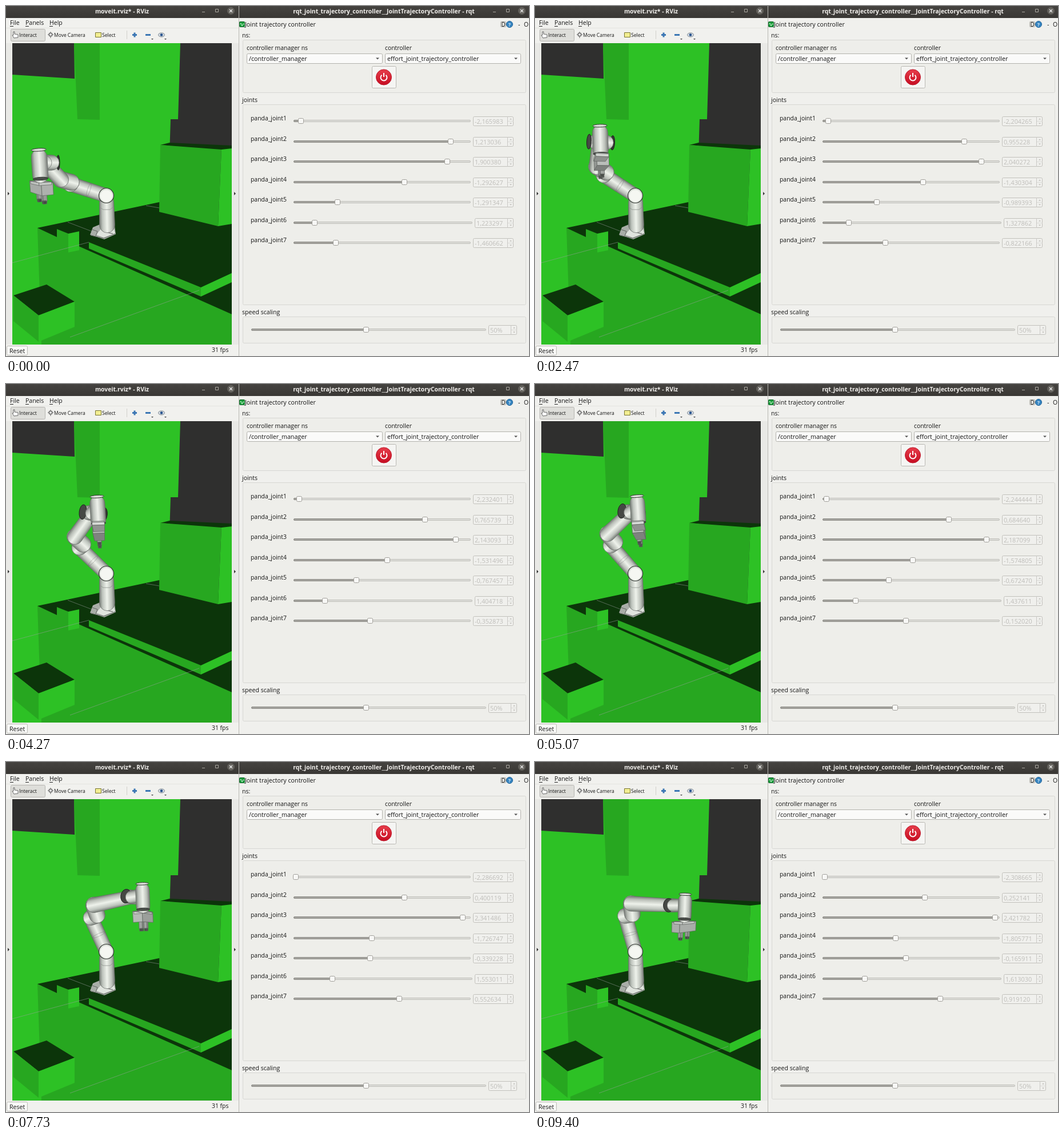
Recreate the animation shown at these times as an HTML page with a canvas. Size 915x612 px, loop 9.47 s.

```html
<!DOCTYPE html>
<html lang="en">
<head>
<meta charset="utf-8">
<title>Joint trajectory</title>
<style>
  html, body { margin: 0; width: 100%; height: 100%; overflow: hidden; background: #f0f0ed; }
  canvas { display: block; }
</style>
</head>
<body>
<canvas id="stage" width="915" height="612"></canvas>
<script>
const c = document.getElementById('stage').getContext('2d');
const LOOP = 9470, STEP = 200 / 3;

// Trajectory progress at a few steps; every joint follows it
const PACE = [[0, 0], [22, 0.1555], [52, 0.3811], [76, 0.5499], [97, 0.7057], [116, 0.846], [141, 1]];

const JOINTS = [
  { from: -2.165983, to: -2.308665, marks: [3, 0] },
  { from: 1.213036, to: 0.252141, marks: [90, 58] },
  { from: 1.900380, to: 2.421782, marks: [88, 99] },
  { from: -1.292627, to: -1.805771, marks: [63, 41] },
  { from: -1.291347, to: -0.165911, marks: [24, 47] },
  { from: 1.223297, to: 1.613030, marks: [11, 23] },
  { from: -1.460662, to: 0.919120, marks: [23, 67] }
];

const lerp = (a, b, u) => a + (b - a) * u;

function progress(step) {
  const i = Math.max(1, PACE.findIndex(([s]) => s >= step));
  const [s0, p0] = PACE[i - 1], [s1, p1] = PACE[i];
  return lerp(p0, p1, (step - s0) / (s1 - s0));
}

/* ---------- drawing helpers ---------- */

function paint(fill, stroke, width = 1) {
  if (fill) { c.fillStyle = fill; c.fill(); }
  if (stroke) { c.strokeStyle = stroke; c.lineWidth = width; c.stroke(); }
}

function rect(x, y, w, h, fill, stroke, r = 0) {
  const o = stroke ? 0.5 : 0;
  c.beginPath();
  c.roundRect(x + o, y + o, w - 2 * o, h - 2 * o, r);
  paint(fill, stroke);
}

function circle(x, y, r, fill, stroke, width) {
  c.beginPath();
  c.arc(x, y, r, 0, 7);
  paint(fill, stroke, width);
}

function poly(coords, fill, stroke) {
  c.beginPath();
  for (let i = 0; i < coords.length; i += 2) c.lineTo(coords[i], coords[i + 1]);
  c.closePath();
  paint(fill, stroke, 0.7);
}

function line(coords, color, width = 1) {
  c.beginPath();
  for (let i = 0; i < coords.length; i += 2) c.lineTo(coords[i], coords[i + 1]);
  paint(null, color, width);
}

function text(str, x, y, size = 10.6, color = '#151515', weight = 400, align = 'left') {
  c.font = `${weight} ${size}px "Open Sans", "Noto Sans", sans-serif`;
  c.textAlign = align;
  c.fillStyle = color;
  c.fillText(str, x, y);
}

const arrowDown = (x, y, s, color) => poly([x - s, y - s / 2, x + s, y - s / 2, x, y + s / 2], color);
const arrowUp = (x, y, s, color) => poly([x - s, y + s / 2, x + s, y + s / 2, x, y - s / 2], color);

// Tapered round-ended shell, shaded across its width
function shell(x1, y1, r1, x2, y2, r2) {
  const len = Math.hypot(x2 - x1, y2 - y1), r = Math.max(r1, r2);
  const shade = c.createLinearGradient(0, -r, 0, r);
  [[0, '#737773'], [0.2, '#b9beb7'], [0.5, '#eef2eb'], [0.8, '#bdc3bc'], [1, '#727872']]
    .forEach(s => shade.addColorStop(...s));
  c.save();
  c.translate(x1, y1);
  c.rotate(Math.atan2(y2 - y1, x2 - x1));
  c.beginPath();
  c.arc(0, 0, r1, Math.PI / 2, Math.PI * 1.5);
  c.arc(len, 0, r2, -Math.PI / 2, Math.PI / 2);
  c.closePath();
  paint(shade, '#686c68', 0.7);
  c.restore();
}

/* ---------- arm: joint angles to 3D, metres from the shoulder ---------- */

const mix = (a, u, b, v) => a.map((x, i) => x * u + b[i] * v);
const move = (p, axis, k) => mix(p, 1, axis, k);

function spinZ({ x, y, z }, q) {
  const cos = Math.cos(q), sin = Math.sin(q);
  return { x: mix(x, cos, y, sin), y: mix(y, cos, x, -sin), z };
}

function spinY({ x, y, z }, q) {
  const cos = Math.cos(q), sin = Math.sin(q);
  return { x: mix(x, cos, z, -sin), y, z: mix(x, sin, z, cos) };
}

const CAMERA = { yaw: 0.77, pitch: 0.2, scale: 202, distance: 1.75 };
const toward = ([x, y]) => x * Math.sin(CAMERA.yaw) - y * Math.cos(CAMERA.yaw);
const depth = p => toward(p) * Math.cos(CAMERA.pitch) + p[2] * Math.sin(CAMERA.pitch);

function project(p) {
  const zoom = 1 / (1 - depth(p) / CAMERA.distance), k = CAMERA.scale * zoom;
  const right = p[0] * Math.cos(CAMERA.yaw) + p[1] * Math.sin(CAMERA.yaw);
  const up = p[2] * Math.cos(CAMERA.pitch) - toward(p) * Math.sin(CAMERA.pitch);
  return [203 + k * right - 27.5 * zoom, 328 - k * up + 3.5 * zoom, k];
}

function tube(a, b, ra, rb = ra) {
  const [x1, y1, k1] = project(a), [x2, y2, k2] = project(b);
  shell(x1, y1, ra * k1, x2, y2, rb * k2);
}

function disc(p, normal, r, fill, stroke) {
  const [x, y, k] = project(p), [x2, y2] = project(move(p, normal, 0.01));
  c.beginPath();
  c.ellipse(x, y, r * k * Math.max(0.2, Math.abs(depth(normal))), r * k, Math.atan2(y2 - y, x2 - x), 0, 7);
  paint(fill, stroke);
}

// Box along the axes of a frame: only faces turned to the camera, lit by their angle
function box(center, frame, half, tone) {
  const axes = [frame.x, frame.y, frame.z];
  axes.forEach((axis, i) => {
    const side = Math.sign(depth(axis)), j = (i + 1) % 3, k = (i + 2) % 3;
    const face = move(center, axis, side * half[i]);
    const corners = [[-1, -1], [1, -1], [1, 1], [-1, 1]].flatMap(([u, v]) =>
      project(move(move(face, axes[j], u * half[j]), axes[k], v * half[k])).slice(0, 2));
    const light = Math.round(tone * (0.65 + 0.35 * Math.abs(depth(axis))));
    poly(corners, `rgb(${light},${light + 4},${light})`, '#5f645f');
  });
}

function arm(q) {
  let f = { x: [1, 0, 0], y: [0, 1, 0], z: [0, 0, 1] };
  const shoulder = [0, 0, 0];
  f = spinZ(spinY(spinZ(f, q[0]), q[1]), q[2]);
  const elbow = move(shoulder, f.z, 0.316);
  const pivot = move(elbow, f.x, 0.0825);
  f = spinY(f, -q[3]);
  const forearm = move(pivot, f.x, -0.0825);
  const wrist = move(forearm, f.z, 0.384);
  f = spinZ(f, q[4]);
  const motor = f.y;
  f = spinY(f, -q[5]);
  const flange = move(wrist, f.x, 0.088);
  const tool = spinZ({ x: f.x, y: mix(f.y, -1, f.y, 0), z: mix(f.z, -1, f.z, 0) }, q[6] - Math.PI / 4);
  const reach = d => move(flange, tool.z, d);

  const parts = [
    [mix(shoulder, 0.5, elbow, 0.5), () => {
      tube(shoulder, elbow, 0.06);
      disc(mix(shoulder, 0.5, elbow, 0.5), elbow, 0.058, null, 'rgba(100,105,100,.35)');
    }],
    [mix(elbow, 0.5, pivot, 0.5), () => tube(elbow, pivot, 0.064)],
    [mix(pivot, 0.5, forearm, 0.5), () => tube(pivot, forearm, 0.064)],
    [mix(forearm, 0.7, wrist, 0.3), () => tube(forearm, wrist, 0.06, 0.044)],
    [wrist, () => {
      const ends = [-0.06, 0.08].map(d => move(wrist, motor, d));
      if (depth(motor) < 0) ends.reverse();
      disc(ends[0], motor, 0.045, '#333632', '#1f211f');
      tube(move(wrist, motor, -0.02), move(wrist, motor, 0.04), 0.046);
      disc(ends[1], motor, 0.045, '#454844', '#1f211f');
    }],
    [flange, () => {
      tube(wrist, flange, 0.042);
      tube(reach(-0.03), reach(0.07), 0.044);
      disc(reach(-0.07), tool.z, 0.041, '#d9ddd6', '#303330');
      disc(reach(0.09), tool.z, 0.043, '#4c504b', '#303330');
    }],
    [reach(0.16), () => {
      for (const side of [-1, 1]) {
        const finger = move(reach(0.19), tool.y, side * 0.04);
        box(finger, tool, [0.011, 0.012, 0.024], 165);
        box(move(finger, tool.z, 0.03), tool, [0.009, 0.009, 0.008], 75);
      }
      box(reach(0.14), tool, [0.031, 0.095, 0.033], 190);
      box(reach(0.113), tool, [0.034, 0.07, 0.008], 215);
    }]
  ];
  parts.sort((a, b) => depth(a[0]) - depth(b[0])).forEach(([, drawPart]) => drawPart());
}

function robot(q) {
  poly([147, 400, 152, 387, 164, 382, 190, 384, 192, 399, 172, 408], '#a9aea8');
  poly([158, 400, 166, 390, 188, 387, 191, 398, 171, 405], '#e0e4de');
  line([148, 401, 171, 406, 191, 398], '#666b66');
  line([151, 391, 160, 394, 157, 402], '#606460');
  line([176, 396, 187, 398], '#555');
  shell(176, 343, 12.5, 177, 383, 13.5);
  line([164, 352, 170, 356, 182, 356, 188, 351], '#8c918b', 0.8);
  arm(q);
  circle(175.5, 331.5, 13, '#dce2da', '#323632', 1.2);
  circle(175.5, 332, 10.5, '#f5f7f2');
}

function scene() {
  const bright = '#2dc125', mid = '#27a720', dark = '#0c350a';
  rect(11, 65, 384, 527, '#2f2f2e');
  poly([11, 120, 120, 127, 119, 65, 305, 65, 301, 198, 288, 198, 286, 260, 286, 592, 11, 592], bright);
  poly([119, 65, 164, 65, 164, 199, 125, 198], mid);
  poly([55, 388, 395, 388, 395, 592, 62, 592], mid);
  poly([55, 388, 268, 343, 395, 370, 395, 539, 125, 419, 128, 395, 89, 404], dark);
  poly([270, 243, 286, 239, 395, 244, 395, 250, 377, 252], dark);
  poly([270, 243, 377, 251, 371, 385, 268, 360], mid);
  poly([377, 251, 395, 249, 395, 381, 371, 385], bright);
  poly([145, 413, 341, 492, 341, 508, 145, 424], mid);
  poly([341, 492, 395, 467, 395, 483, 341, 508], bright);
  poly([89, 390, 109, 398, 109, 431, 89, 424], mid);
  poly([109, 398, 128, 394, 128, 427, 109, 431], bright);
  poly([13, 506, 71, 487, 120, 517, 57, 541], dark);
  poly([13, 506, 57, 541, 57, 587, 13, 551], mid);
  poly([57, 541, 120, 517, 120, 561, 57, 587], bright);
  const grid = 'rgba(160,160,164,.5)';
  line([11, 449, 145, 413], grid);
  line([112, 579, 338, 497], grid);
  line([108, 378, 150, 394], grid);
  line([245, 349, 268, 353], grid);
}

/* ---------- windows ---------- */

function titleBar(x, w, title, middle, minimise) {
  const bar = c.createLinearGradient(0, 0, 0, 21);
  bar.addColorStop(0, '#454340');
  bar.addColorStop(1, '#393734');
  rect(x, 0, w, 21, bar);
  text(title, middle, 13, 10.4, '#f1efec', 700, 'center');
  line([minimise - 2, 10.5, minimise + 3, 10.5], '#aaa7a0');
  rect(minimise + 21, 5, 6, 6, null, '#aaa7a0');
  const x0 = minimise + 48.5;
  circle(x0, 8.5, 6.5, '#64625d');
  line([x0 - 2.5, 6, x0 + 2.5, 11], '#eee', 1.2);
  line([x0 + 2.5, 6, x0 - 2.5, 11], '#eee', 1.2);
}

function viewer(q) {
  rect(0, 0, 407, 612, '#f1f1ee');
  titleBar(0, 407, 'moveit.rviz* - RViz', 203, 345);
  [['File', 7], ['Panels', 34], ['Help', 76]].forEach(([label, x]) => {
    text(label, x, 33, 10.5);
    line([x, 35.5, x + 6, 35.5], '#222');
  });
  line([0, 38.5, 407, 38.5], '#e4e4e0');
  rect(8, 40, 61, 22, '#dededa', '#b5b4b0', 2);
  text('Interact', 23, 54, 8.6);
  text('Move Camera', 84, 54, 8.5);
  text('Select', 168, 54, 8.6);
  const hand = [13, 51, 13, 45, 15, 45, 15, 49, 21, 50, 21, 55, 14, 56, 11, 51];
  poly(hand, '#fff', '#333');
  line([73, 50, 83, 50], '#555');
  line([78, 45, 78, 56], '#555');
  rect(75, 47, 6, 6, '#ddd', '#555');
  rect(156, 46, 11, 9, '#f2ee91', '#777432');
  line([211.5, 43, 211.5, 58], '#d1d0cc');
  line([221, 50.5, 229, 50.5], '#3c77b4', 3);
  line([225, 46.5, 225, 54.5], '#3c77b4', 3);
  line([244, 50.5, 253, 50.5], '#3c77b4', 3);
  arrowDown(256, 58, 2, '#444');
  arrowDown(279, 58, 2, '#444');
  c.beginPath();
  c.ellipse(272, 50.5, 5.5, 3.5, 0, 0, 7);
  paint('#d5dce4', '#7c868f');
  circle(272, 50.5, 2.3, '#24508b');

  for (const [x, w] of [[0, 10], [396, 11]]) {
    rect(x, 65, w, 527, '#e9e9e6');
    poly([x + 3, 325, x + 3, 331, x + 6, 328], '#333');
  }

  c.save();
  c.beginPath();
  c.rect(11, 65, 384, 527);
  c.clip();
  scene();
  robot(q);
  c.restore();

  rect(1, 594, 37, 17, '#f8f8f6', '#bbbab5', 2);
  text('Reset', 6, 607, 10.6);
  text('31 fps', 360, 605, 10.4);
  line([407.5, 0, 407.5, 612], '#b9b8b3');
}

function combo(x, label) {
  rect(x, 83, 238, 18, '#fafaf9', '#b3b2ad', 2);
  text(label, x + 4, 96, 10.7);
  arrowDown(x + 229, 92, 3, '#555');
}

function slider(x1, x2, y, handle) {
  rect(x1, y - 2, x2 - x1, 4, '#dcdcd8', '#c1c0bb', 1.5);
  rect(x1, y - 2, handle - x1, 4, '#a5a49f', '#8e8d88', 1.5);
  rect(handle - 5, y - 5, 10, 10, '#f8f8f6', '#a19f9a', 2);
}

function spin(x, right, y, label) {
  rect(x, y - 8, right - x, 17, '#f0f0ed', '#c2c1bc', 2);
  line([right - 10.5, y - 8, right - 10.5, y + 9], '#c9c8c4');
  line([right - 10, y + 0.5, right, y + 0.5], '#dadad6');
  arrowUp(right - 5, y - 3.5, 2, '#bbbab5');
  arrowDown(right - 5, y + 4.5, 2, '#bbbab5');
  text(label, x + 3, y + 5, 10.9, '#bebdb9');
}

function controller(q, done) {
  rect(408, 0, 507, 612, '#f0f0ed');
  titleBar(408, 507, 'rqt_joint_trajectory_controller__JointTrajectoryController - rqt', 661, 854);
  rect(408, 27, 10, 10, '#1b9c3c', '#12642a', 1);
  line([409, 32, 411, 30, 413, 35, 415, 31, 417, 32], '#c8f4ce');
  text('Joint trajectory controller', 418, 36, 10.7);
  rect(865, 27, 10, 10, '#e4e4e0', '#aaa9a4', 1);
  text('D', 866.5, 36, 10);
  circle(881, 32, 5.5, '#3684c0', '#22659a');
  text('?', 881, 35.5, 9, '#d6eaf8', 700, 'center');
  text('-', 896, 36, 11);
  text('O', 906, 36, 10.5);

  text('ns:', 413, 55);
  [[59, 93], [172, 351], [543, 47]].forEach(([y, h]) => rect(414, y, 496, h, '#eeeeea', '#d7d7d3', 2));
  text('controller manager ns', 421, 77, 10.4);
  text('controller', 663, 77, 10.4);
  combo(421, '/controller_manager');
  combo(663, 'effort_joint_trajectory_controller');

  rect(640, 105, 43, 39, '#f5f5f3', '#b9b8b3', 2);
  const red = c.createLinearGradient(0, 110, 0, 138);
  red.addColorStop(0, '#e8404d');
  red.addColorStop(1, '#c60d22');
  circle(661, 124.5, 13.5, red, '#bd1427');
  c.beginPath();
  c.arc(661, 125, 5.5, -0.9, Math.PI + 0.9);
  paint(null, '#fff', 2);
  line([661, 117, 661, 124], '#fff', 2);

  text('joints', 413, 168);
  JOINTS.forEach(({ marks }, i) => {
    const y = Math.round(201 + i * 35.5), shift = i === 5 ? 3 : 0;
    const mark = Math.round(lerp(...marks, done));
    text('panda_joint' + (i + 1), 428, y - 1, 10.4);
    slider(503, 813 + shift, y, Math.round(507.3 + mark * 3.01));
    spin(817 + shift, 888, y, q[i].toFixed(6).replace('.', ','));
  });

  text('speed scaling', 413, 539);
  slider(429, 840, 566, 630);
  spin(844, 894, 566, '50%');
}

function draw() {
  const t = performance.now() % LOOP;
  const done = progress(Math.min(141, Math.floor((t + 4) / STEP)));
  const q = JOINTS.map(({ from, to }) => lerp(from, to, done));
  viewer(q);
  controller(q, done);
  requestAnimationFrame(draw);
}
draw();
</script>
</body>
</html>
```
